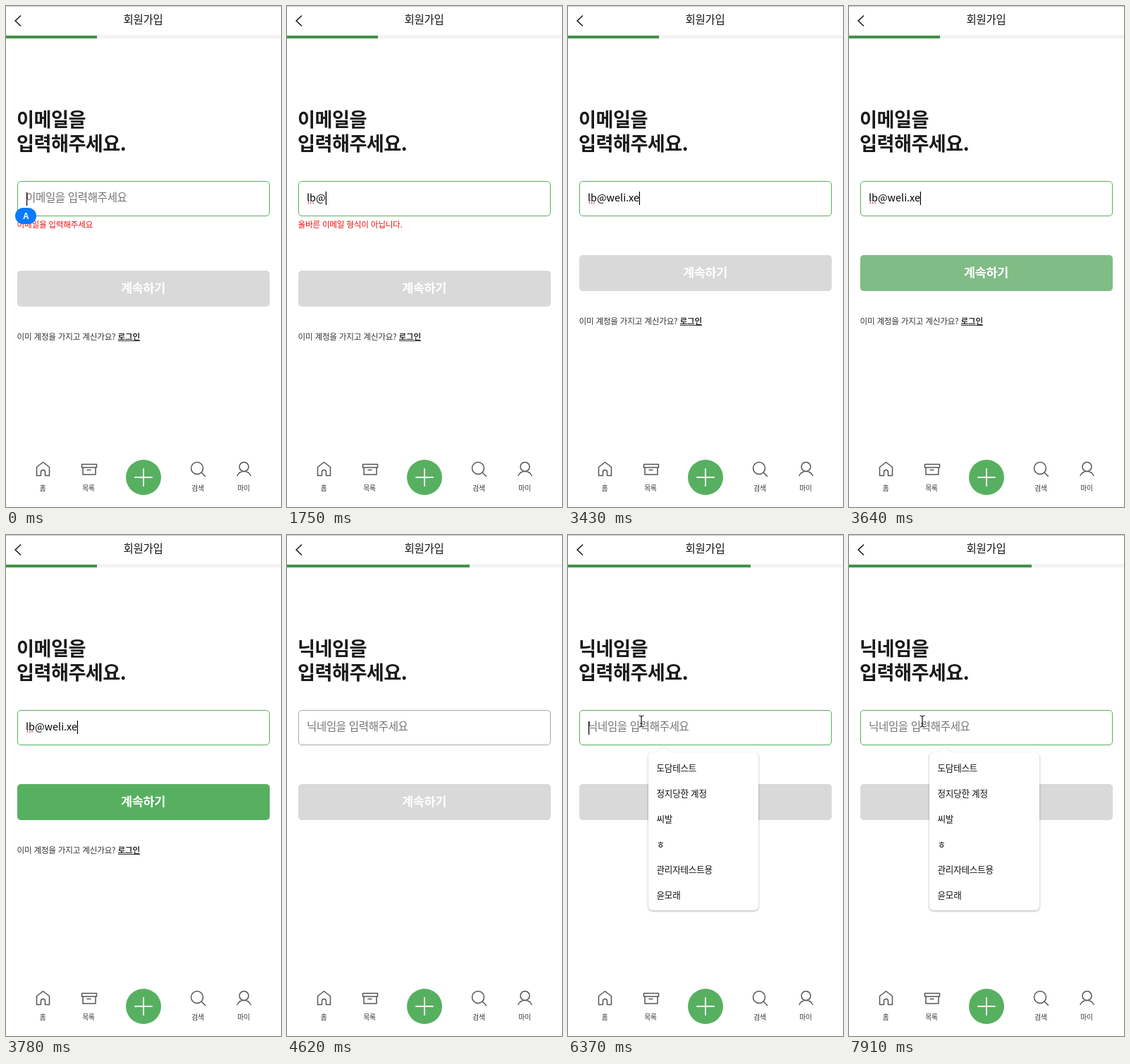
Recreate the animation shown at these times as an HTML page. Size 390x710 px, loop 8 s.

```html
<!DOCTYPE html>
<html lang="ko">
<head>
<meta charset="utf-8">
<style>
html, body { margin: 0; width: 100%; height: 100%; overflow: hidden; background: #fff; }
svg { display: block; width: 390px; height: 710px; }
text { font-family: "Noto Sans CJK KR", "Noto Sans CJK", "Noto Sans CJK JP", sans-serif; letter-spacing: -.02em; fill: #111; white-space: pre; }
.mid { text-anchor: middle; }
.head { font-size: 27.2px; font-weight: 600; fill: #1a1a1a; }
.field { font-size: 15.5px; }
.small { font-size: 11.64px; fill: #333; }
.menu text { font-size: 12.6px; font-weight: 500; }
.nav text { font-size: 9.7px; fill: #333; text-anchor: middle; }
.nav path { fill: none; stroke: #555; stroke-width: 1.5; stroke-linejoin: round; stroke-linecap: round; }
.menu { filter: drop-shadow(0 1px 1.5px rgba(0, 0, 0, .32)); }
</style>
</head>
<body>
<svg viewBox="0 0 390 710">
  <rect width="390" height="710" fill="#fff"/>
  <path d="M0 .5H390" stroke="#c4c4c4"/>
  <path d="M21 13.5L13.2 21L21 28.5" fill="none" stroke="#222" stroke-width="1.7"/>
  <text class="mid field" x="194.5" y="25" font-weight="500">회원가입</text>
  <rect y="41" width="390" height="5" fill="#f3f3f3"/>
  <rect id="bar" y="42" height="4" fill="#43914a"/>

  <text id="head" class="head" x="15" y="171"></text>
  <text class="head" x="15" y="205">입력해주세요.</text>

  <rect id="box" x="16.5" y="248.5" width="357" height="49" rx="4.5" fill="#fff"/>
  <text id="hint" class="field" x="28" y="277" style="fill:#757575"></text>
  <text id="mail" x="28" y="276.5" style="font-size:14.4px;letter-spacing:0;fill:#000"></text>
  <g id="dots" fill="#e0344a">
    <circle cx="30.3" cy="279" r=".9"/><circle cx="33.7" cy="279" r=".9"/><circle cx="37.1" cy="279" r=".9"/>
  </g>
  <rect id="caret" width="1.2" height="19"/>
  <text id="error" class="small" x="15.5" y="314" style="fill:#e60f0f"></text>
  <g id="badge">
    <rect x="13" y="286" width="30" height="23" rx="11.5" fill="#0a7aff"/>
    <text class="mid" x="28.3" y="302" style="font:bold 12px 'Liberation Sans',sans-serif;fill:#fff">A</text>
  </g>

  <g id="form">
    <rect x="16" y="353" width="358" height="51" rx="5" fill="#d9d9d9"/>
    <rect id="ready" x="16" y="353" width="358" height="51" rx="5" fill="#57b060"/>
    <text class="mid" x="194.5" y="383.5" style="font-size:17.5px;font-weight:600;fill:#fff">계속하기</text>
    <g id="login">
      <text class="small" x="15.5" y="451">이미 계정을 가지고 계신가요?</text>
      <text class="small" x="158.5" y="451" font-weight="600">로그인</text>
      <path d="M159 452.5H190" stroke="#333"/>
    </g>
  </g>

  <g class="nav">
    <path d="M43.5 653.5L52.5 646.5L61.5 653.5V665.5H55.5V660.5a3 3 0 0 0-6 0V665.5H43.5Z"/>
    <path d="M107.5 649.5H128.5V654H107.5ZM109 654V664H127V654M115 657.5H120"/>
    <circle cx="195" cy="668" r="25" fill="#57b060"/>
    <path d="M183 668H207M195 656V680" style="stroke:#fff;stroke-width:1.8"/>
    <path d="M262.5 655a8.5 8.5 0 0 1 17 0a8.5 8.5 0 0 1-17 0M277.2 661.2L282.5 666.5"/>
    <path d="M331 653a6.5 6.5 0 0 1 13 0a6.5 6.5 0 0 1-13 0M328 665.5C330 661 334 659.5 337.5 659.5S345 661 347 665.5"/>
    <text x="52" y="687">홈</text><text x="117" y="687">목록</text>
    <text x="272" y="687">검색</text><text x="337" y="687">마이</text>
  </g>

  <g id="menu" class="menu">
    <path fill="#fff" d="M120 308H124C130 308 133 301 136 301S142 308 148 308H264a6 6 0 0 1 6 6V526a6 6 0 0 1-6 6H120a6 6 0 0 1-6-6V314a6 6 0 0 1 6-6Z"/>
  </g>

  <g id="arrow">
    <path d="M0 0V15L3.6 11.8L6 17.3L8.6 16.2L6.2 10.8H11Z" stroke="#fff" stroke-width="1.2"/>
  </g>
  <g id="beam" fill="none">
    <path d="M-3.5-8Q0-8 0-5.5Q0-8 3.5-8M0-5.5V5.5M-3.5 8Q0 8 0 5.5Q0 8 3.5 8M-1.8 3H1.8" stroke="#fff" stroke-width="2.6"/>
    <path d="M-3.5-8Q0-8 0-5.5Q0-8 3.5-8M0-5.5V5.5M-3.5 8Q0 8 0 5.5Q0 8 3.5 8M-1.8 3H1.8" stroke="#111" stroke-width="1.2"/>
  </g>
</svg>
<script>
const $ = id => document.getElementById(id);
const show = (id, on) => $(id).setAttribute('visibility', on ? 'visible' : 'hidden');
const set = (id, attrs) => { for (const k in attrs) $(id).setAttribute(k, attrs[k]); };
const write = (id, s) => { if ($(id).textContent !== s) $(id).textContent = s; };

const LOOP = 8000, TICK = 70;
const VALID = 3430, NEXT = 4620, FOCUS = 6300;
const EMAIL = 'lb@weli.xe';
const KEYS = [70, 350, 630, 2240, 2450, 2590, 2800, 3080, VALID, VALID];
const PATH = [[234, 540], [160, 430], [82, 330], [93, 286], [104, 264]];
const ENTER = 5880;

['도담테스트', '정지당한 계정', '씨발', 'ㅎ', '관리자테스트용', '윤모래'].forEach((s, i) => {
  const el = document.createElementNS('http://www.w3.org/2000/svg', 'text');
  el.setAttribute('x', 125.5);
  el.setAttribute('y', 335 + 36 * i);
  el.textContent = s;
  $('menu').append(el);
});

function ease(p) {
  p = Math.max(0, Math.min(1, p));
  return p * p * (3 - 2 * p);
}

function draw(t) {
  const second = t >= NEXT, focused = !second || t >= FOCUS;
  const noun = second ? '닉네임을' : '이메일을';
  const typed = second ? '' : EMAIL.slice(0, KEYS.filter(k => t >= k).length);

  set('bar', { width: second ? 259 : 129 });
  write('head', noun);
  set('box', { stroke: focused ? '#57b060' : '#a6a6a6' });
  write('hint', typed ? '' : noun + ' 입력해주세요');
  write('mail', typed);
  show('dots', t >= 1750 && !second);
  show('badge', t < 70);

  write('error', typed ? '올바른 이메일 형식이 아닙니다.' : '이메일을 입력해주세요');
  show('error', t < VALID);
  set('form', { transform: `translate(0 ${t < VALID ? 22 : 0})` });
  const step = Math.floor(t / TICK) * TICK;
  set('ready', { opacity: second ? 0 : ease((step - VALID) / 340) });
  show('login', !second);

  const blinkOff = (t >= 6860 && t < 7350) || t >= 7910;
  show('caret', focused && !blinkOff);
  set('caret', typed
    ? { x: Math.round(28 + $('mail').getComputedTextLength()) - .2, y: 263 }
    : { x: 29, y: 264 });

  show('menu', t >= 6370);
  const i = Math.min(PATH.length - 1, Math.max(0, Math.floor((t - ENTER) / TICK)));
  const [x, y] = PATH[i], inField = y < 298, here = `translate(${x} ${y})`;
  show('arrow', t >= ENTER && !inField);
  show('beam', t >= ENTER && inField);
  set('arrow', { transform: here });
  set('beam', { transform: here });
}

function frame() {
  draw(performance.now() % LOOP);
  requestAnimationFrame(frame);
}
frame();
</script>
</body>
</html>
```
